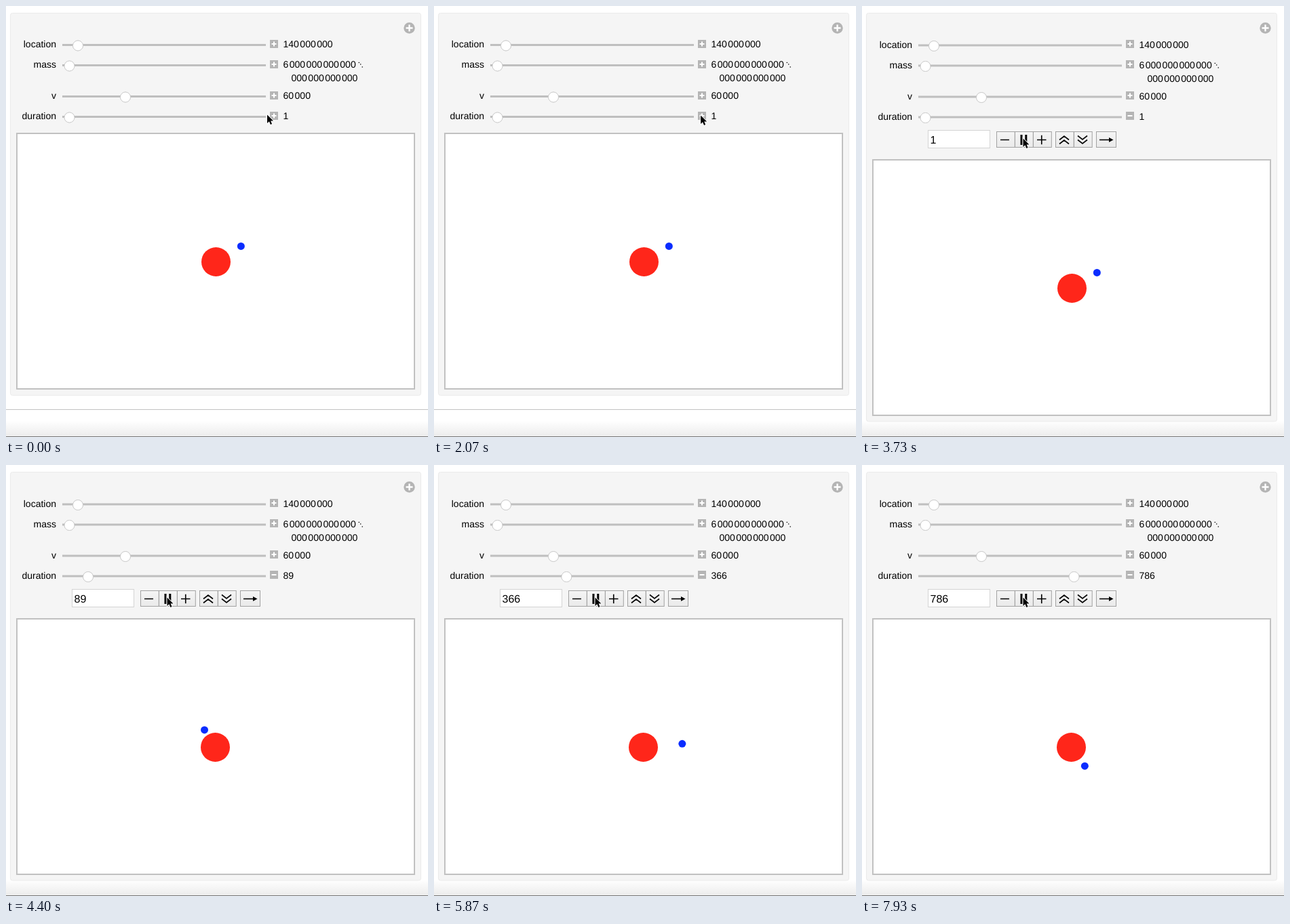
An HTML page that plays this animation: 622 by 636 pixels, repeating every 8 s.

```html
<!DOCTYPE html>
<html lang="en">
<head>
<meta charset="utf-8">
<title>Orbit controls</title>
<style>
  html, body { margin: 0; width: 100%; height: 100%; overflow: hidden; background: #fff; }
  svg { display: block; }
  text {
    font: 14px "Liberation Sans", Arial, sans-serif;
    word-spacing: -2.4px;
    text-rendering: geometricPrecision;
  }
  .label { text-anchor: end; }
  .field { font-size: 16px; }
  .track { stroke: #bfbfbf; stroke-width: 3; }
  .knob { fill: #fff; stroke: #cdcdcd; filter: drop-shadow(0 .5px .5px #0002); }
  .sign { stroke: #fff; stroke-width: 2; }
  .icon { fill: none; stroke: #000; stroke-width: 1.6; }
  .button { fill: url(#face); stroke: #a2a2a2; }
</style>
</head>
<body>
<svg width="622" height="636" viewBox="0 0 622 636">
  <defs>
    <linearGradient id="face" x2="0" y2="1">
      <stop stop-color="#f5f5f5"/><stop offset="1" stop-color="#eaeaea"/>
    </linearGradient>
    <linearGradient id="fade" x2="0" y2="1">
      <stop stop-color="#fff"/><stop offset="1" stop-color="#ececec"/>
    </linearGradient>
  </defs>
  <rect y="612" width="622" height="23" fill="url(#fade)"/>
  <rect y="635" width="622" height="1" fill="#777"/>
  <rect id="rule" y="595" width="622" height="1" fill="#c2c2c2"/>
  <rect id="panel" x="6.5" y="10.5" width="605" height="564" rx="3" fill="#f5f5f5" stroke="#ebebeb"/>
  <circle cx="594.5" cy="32.5" r="8.2" fill="#b4b4b4"/>
  <path d="M589.5 32.5h10m-5 -5v10" stroke="#fff" stroke-width="2.3"/>

  <g id="sliders"></g>
  <g id="signs"></g>
  <g id="labels">
    <path d="M520.3 83.5h0M522.7 86h0M525.2 90h0" stroke="#000" stroke-width="1.6" stroke-linecap="round"/>
    <text x="420.5" y="111">000 000 000 000</text>
  </g>

  <g id="tools">
    <rect x="97.5" y="183.5" width="91" height="26" fill="#fff" stroke="#d4d4d4"/>
    <text id="field" class="field" x="100.5" y="203">1</text>
    <g id="buttons"></g>
    <path class="icon" d="M204 197.500h13M258 197.500h13.500m-6.750 -6.750v13.500"/>
    <path class="icon" d="M291 197.500l7 -5.500 7 5.500m-14 6l7 -5.500 7 5.500M318 191.500l7 5.500 7 -5.500m-14 6l7 5.500 7 -5.500"/>
    <path class="icon" d="M350 197.500h16"/>
    <path d="M364 194l6.500 3.500 -6.500 3.500z"/>
    <path id="play" d="M235 190l7.500 7.500 -7.500 7.500z"/>
    <path id="pause" d="M233.500 190h3v15h-3zM240.300 190h3v15h-3z"/>
  </g>

  <g id="view">
    <rect x="16" y="188" width="586" height="377" fill="#fff" stroke="#c1c1c1" stroke-width="2"/>
    <circle id="sun" cy="377.5" r="21.5" fill="#ff261a"/>
    <circle id="planet" r="5.5" fill="#0a2cff"/>
  </g>
  <path id="cursor" d="M0 .5V13L2.900 10.300L4.900 14.900L7 14L5.100 9.500H9Z" stroke="#fff" stroke-width="1.6" paint-order="stroke"/>
</svg>
<script>
  const $ = id => document.getElementById(id);
  const add = (parent, tag, attrs, text) => {
    const el = document.createElementNS("http://www.w3.org/2000/svg", tag);
    for (const name in attrs) el.setAttribute(name, attrs[name]);
    if (text) el.textContent = text;
    return parent.appendChild(el);
  };
  const move = (el, x, y) => el.setAttribute("transform", `translate(${x} ${y})`);
  const show = (el, on) => el.style.display = on ? "" : "none";

  function addRow(name, value, y, x) {
    add($("labels"), "text", { class: "label", x: 74, y }, name);
    add($("sliders"), "path", { class: "track", d: `M83 ${y - 3.5}H383` });
    add($("signs"), "rect", { x: 389, y: y - 11, width: 12, height: 12, fill: "#b5b5b5" });
    add($("signs"), "path", { class: "sign", d: `M391.5 ${y - 5}h7` });
    return {
      value: add($("labels"), "text", { x: 408.5, y }, value),
      knob: add($("sliders"), "circle", { class: "knob", cx: x, cy: y - 2.5, r: 7.5 }),
      bar: add($("signs"), "path", { class: "sign", d: `M395 ${y - 8.5}v7` })
    };
  }
  addRow("location", "140 000 000", 61, 106);
  addRow("mass", "6 000 000 000 000", 91, 93.5);
  addRow("v", "60 000", 137, 176);
  const duration = addRow("duration", "1", 167, 93.5);

  // Button groups: left edge, count, width
  for (const [left, count, w] of [[198.5, 3, 26.8], [285.5, 2, 26.7], [345.5, 1, 29]])
    for (let i = 0; i < count; i++)
      add($("buttons"), "rect", { class: "button", x: left + Math.round(i * w), y: 185.5, width: w, height: 23 });

  // Interpolates rows of [tick, ...values]
  function at(keys, k) {
    const i = Math.max(1, keys.findIndex(row => row[0] >= k));
    const a = keys[i - 1], b = keys[i];
    const f = Math.min(1, Math.max(0, (k - a[0]) / (b[0] - a[0])));
    return a.slice(1).map((v, j) => v + (b[j + 1] - v) * f);
  }

  const LOOP = 8000, TICKS = 15 / 1000;
  const OPEN = 35, PRESS = 56, START = 58, BUSY = 92, END = 120;
  const mouse = [[0, 385, 160], [6, 393.5, 161], [42, 393, 161], [47, 292, 167],
    [51, 246, 207], [55, 237.5, 195], [END, 237.5, 195]];
  // tick, count shown, slider value, orbit angle
  const run = [[START, 1, 1, -312], [76, 199, 223, -130], [88, 366, 366, 4], [119, 786, 786, 281],
    [END, 786, 786, 281]];

  function draw(ms) {
    const tick = Math.floor(ms * TICKS + .1), open = tick >= OPEN;
    // The interface drops to every third redraw once it is busy
    const k = tick < BUSY ? tick : tick - (tick + 1) % 3;

    show($("rule"), !open);
    show($("tools"), open);
    show(duration.bar, !open);
    $("panel").setAttribute("height", open ? 602.5 : 564);
    move($("labels"), 0, open ? 1 : 0);
    move($("sliders"), 0, open ? .5 : 0);
    move($("view"), 0, open ? 39 : 0);
    show($("play"), tick < PRESS);
    show($("pause"), tick >= PRESS);

    const [count, slide, angle] = at(run, k);
    duration.value.textContent = $("field").textContent = Math.round(count);
    duration.knob.setAttribute("cx", 93.5 + (slide - 1) * .279);

    // An ellipse that widens a little at first
    const e = angle * Math.PI / 180;
    const size = Math.min(1.01, .872 + Math.max(0, k - START) * .0077);
    $("sun").setAttribute("cx", k > START ? 308.5 : 309.5);
    $("planet").setAttribute("cx", 319.5 + 46 * size * Math.cos(e));
    $("planet").setAttribute("cy", 374.5 - 31 * size * Math.sin(e));
    move($("cursor"), ...at(mouse, tick));
  }

  const begin = performance.now();
  (function loop() {
    draw((performance.now() - begin) % LOOP);
    requestAnimationFrame(loop);
  })();
</script>
</body>
</html>
```
